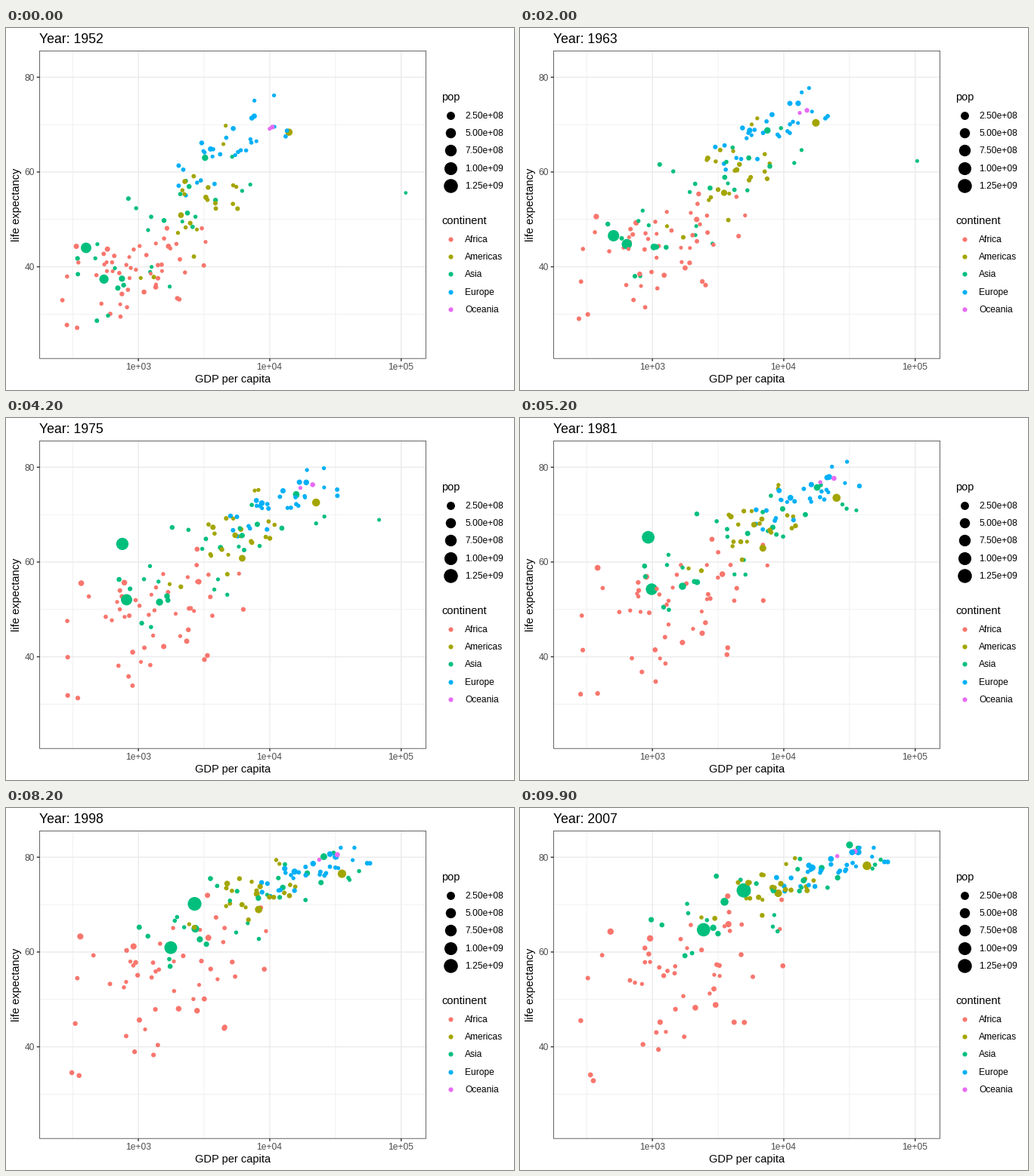
Animation, 672 px wide and 480 px high, one loop 10000 ms. Source, as a matplotlib script:

```python
import numpy as np
import matplotlib.pyplot as plt
from matplotlib.animation import FuncAnimation
from matplotlib.patches import Rectangle

plt.rcParams["font.family"] = "Liberation Sans"

W, H, DPI = 672, 480, 96
PT = 72 / DPI
FRAMES, STEP_MS = 100, 100
LEFT, RIGHT, TOP, BOTTOM = 44.4, 555.6, 30.4, 438.2
X_RANGE = (2.248, 5.189)   # log10 of income
Y_RANGE = (20.65, 85.55)   # life expectancy
MAX_POP = 1319             # millions
GRID, DARK, GREY = "#EBEBEB", "#333333", "#4D4D4D"
SMALL, MEDIUM, LARGE = 9, 11, 13.2

COLORS = {"Africa": "#F8766D", "Americas": "#A3A500", "Asia": "#00BF7D",
          "Europe": "#00B0F6", "Oceania": "#E76BF3"}
YEARS = np.arange(1952, 2008, 5)
SPAN = (YEARS[0], YEARS[-1])

# The few standout dots: continent, population range, (year, income, life) keys
LEADERS = [
    ("Asia", (556, 1319), [(1952, 400, 44), (1962, 488, 44.5), (1972, 677, 63),
                           (1981, 910, 65.2), (2007, 4959, 73)]),
    ("Asia", (372, 1110), [(1952, 547, 37.4), (1972, 724, 50.7),
                           (2007, 2452, 64.7)]),
    ("Asia", (0, 2), [(1952, 108382, 55.6), (1972, 100000, 67.7),
                      (1982, 31354, 71.3), (2007, 47307, 77.6)]),
    ("Asia", (82, 224), [(1952, 750, 37.5), (2007, 3541, 70.6)]),
    ("Asia", (86, 127), [(1952, 3217, 63), (1972, 14779, 73.4),
                         (2007, 31656, 82.6)]),
    ("Americas", (158, 301), [(1952, 13990, 68.4), (2007, 42952, 78.2)]),
    ("Americas", (57, 190), [(1952, 2109, 50.9), (1977, 6660, 61.5),
                             (2007, 9066, 72.4)]),
]

# All other dots: count, correlation, then first and last
# (mean log income, its spread, mean life, its spread)
CLOUDS = {
    "Africa": (52, .4, (2.97, .29, 39, 5.2), (3.24, .42, 55, 9.3)),
    "Americas": (23, .7, (3.46, .24, 53, 8.5), (3.87, .27, 73.3, 3.6)),
    "Asia": (28, .7, (3.14, .38, 47, 8.8), (3.86, .48, 71.5, 6)),
    "Europe": (30, .8, (3.69, .24, 65, 5.2), (4.36, .23, 77.7, 2.6)),
    "Oceania": (2, 1, (4.01, .01, 69.3, .2), (4.47, .07, 80.7, .5)),
}


def px(log_income):
    return np.interp(log_income, X_RANGE, (LEFT, RIGHT))


def py(life):
    return np.interp(life, Y_RANGE, (BOTTOM, TOP))


def diameter(pop):
    return 4.72 + 14.17 * np.sqrt(np.asarray(pop) / MAX_POP)


def area(diam):
    return (np.asarray(diam) * PT) ** 2


def leader(pops, keys):
    year, income, life = np.array(keys).T
    cols = (np.interp(YEARS, year, np.log10(income)),
            np.interp(YEARS, year, life),
            diameter(np.interp(YEARS, SPAN, pops)))
    return [c[:, None] for c in cols]


def cloud(rng, n, corr, first, last):
    """Correlated normal dots whose growth slows down, with a small wobble."""
    t = np.linspace(0, 1, len(YEARS))[:, None]
    ease = 1 - (1 - t) ** 1.6
    mx, sx, my, sy = (a + (b - a) * ease for a, b in zip(first, last))
    z = rng.normal(size=(3, n))
    z = (z - z.mean(1, keepdims=True)) / z.std(1, keepdims=True)
    a, b, c = np.clip(z, -1.8, 1.8)
    wobble = rng.normal(0, .08, (2, len(YEARS), n))
    u = a + wobble[0]
    v = corr * a + np.sqrt(1 - corr ** 2) * b + wobble[1]
    pop = 5 * 2.5 ** t * np.exp(1.1 * c)
    return mx + sx * u, np.minimum(my + sy * v, 82), diameter(pop)


def build():
    """Positions and diameters at every five-year knot, and the colours."""
    rng = np.random.default_rng(12)
    groups = [(name, leader(pops, keys)) for name, pops, keys in LEADERS]
    groups += [(name, cloud(rng, *spec)) for name, spec in CLOUDS.items()]
    x, y, d = (np.hstack(part) for part in zip(*(g for _, g in groups)))
    colors = np.array([COLORS[name] for name, g in groups
                       for _ in range(g[0].shape[1])])
    order = rng.permutation(len(colors))
    return px(x[:, order]), py(y[:, order]), d[:, order], colors[order]


fig = plt.figure(figsize=(W / DPI, H / DPI), dpi=DPI, facecolor="white")
ax = fig.add_axes([0, 0, 1, 1])
ax.set_xlim(0, W)
ax.set_ylim(H, 0)
ax.axis("off")


def line(x, y, color=GRID, width=1.42):
    ax.plot(x, y, color=color, lw=width * PT, zorder=1, snap=False,
            solid_capstyle="butt")


def label(x, y, s, size=SMALL, color="black", **kw):
    return ax.text(x, y, s, fontsize=size, color=color, va="baseline", **kw)


def vline(v, width):
    line([px(v)] * 2, [TOP, BOTTOM], width=width)


def hline(v, width):
    line([LEFT, RIGHT], [py(v)] * 2, width=width)


def legend(y, name, entries):
    label(576, y, name, MEDIUM)
    for i, (text, diam, color) in enumerate(entries):
        cy = y + 20.4 + 23.04 * i
        ax.scatter(587.6, cy, s=area(diam), c=color, lw=0)
        label(607, cy + 4, text)


for v in (2.5, 3.5, 4.5):
    vline(v, .71)
for v in (30, 50, 70):
    hline(v, .71)
for v in (3, 4, 5):
    vline(v, 1.42)
    line([px(v)] * 2, [BOTTOM, BOTTOM + 3.67], DARK)
    label(px(v) - .5, 453, f"1e+0{v}", color=GREY, ha="center")
for v in (40, 60, 80):
    hline(v, 1.42)
    line([LEFT - 3.67, LEFT], [py(v)] * 2, DARK)
    label(38, py(v) + 4.3, str(v), color=GREY, ha="right")
ax.add_patch(Rectangle((LEFT, TOP), RIGHT - LEFT, BOTTOM - TOP, fill=False,
                       ec=DARK, lw=.75 * PT, zorder=5, snap=False))

label(300, 470, "GDP per capita", MEDIUM, ha="center")
label(18, 234.5, "life expectancy", MEDIUM, ha="center", rotation=90,
      rotation_mode="anchor")
title = label(44, 20, "", LARGE)
legend(96, "pop", [(f"{p * 1e6:.2e}", diameter(p), "black")
                   for p in range(250, 1251, 250)])
legend(260, "continent", [(name, 6.16, c) for name, c in COLORS.items()])

X, Y, D, C = build()
dots = ax.scatter(X[0], Y[0], s=area(D[0]), c=C, lw=0, zorder=3)


def update(i):
    pos = i / (FRAMES - 1) * (len(YEARS) - 1)
    k = min(int(pos), len(YEARS) - 2)
    x, y, d = (a[k] + (a[k + 1] - a[k]) * (pos - k) for a in (X, Y, D))
    dots.set_offsets(np.column_stack([x, y]))
    dots.set_sizes(area(d))
    title.set_text(f"Year: {round(YEARS[0] + 5 * pos)}")
    return dots, title


anim = FuncAnimation(fig, update, frames=FRAMES, interval=STEP_MS,
                     repeat=True, repeat_delay=0, blit=False)
plt.show()
```
